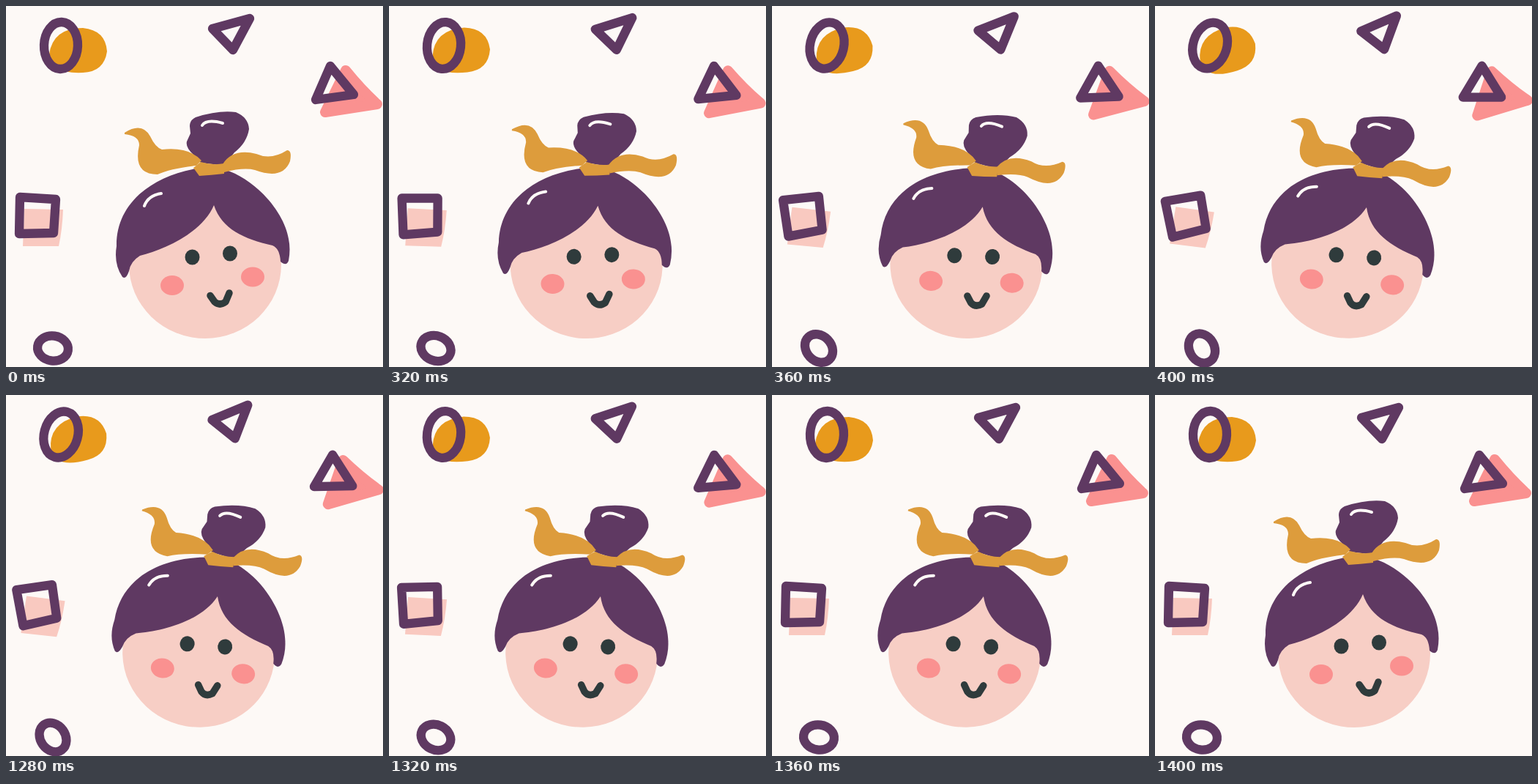
An HTML page for the animation above (1800 ms loop, 515 px wide and 493 px high).

```html
<!DOCTYPE html>
<html lang="en">
<head>
<meta charset="utf-8">
<title>Tilting head</title>
<style>
  html, body { margin: 0; width: 100%; height: 100%; overflow: hidden; background: #fdf9f6; }
  svg { display: block; width: 100%; height: 100%; }
</style>
</head>
<body>
<svg id="stage" viewBox="0 0 515 493"></svg>
<script>
const LOOP = 1800, TICK = 40, PEN = 12.3;
const PLUM = '#5f3962', CORAL = '#fa9190', SKIN = '#f7cec5', INK = '#2f3b3c';
const OCHRE = '#dd9c3c', AMBER = '#e89a1c', BLUSH = '#f9c9c0', SHINE = '#fffaf7';
const stage = document.getElementById('stage');

function add(parent, name, attrs) {
  const node = document.createElementNS('http://www.w3.org/2000/svg', name);
  for (const key in attrs) node.setAttribute(key, attrs[key]);
  return parent.appendChild(node);
}

const fill = (parent, color, d) => add(parent, 'path', { d, fill: color });
const oval = (parent, color, cx, cy, rx, ry) => add(parent, 'ellipse', { cx, cy, rx, ry, fill: color });
const line = (parent, color, width, d, inside = 'none') => add(parent, 'path', {
  d, fill: inside, stroke: color, 'stroke-width': width,
  'stroke-linecap': 'round', 'stroke-linejoin': 'round'
});
const ring = (parent, cx, cy, rx, ry, lean) => add(parent, 'ellipse', {
  cx, cy, rx, ry, fill: 'none', stroke: PLUM, 'stroke-width': PEN,
  transform: `rotate(${lean} ${cx} ${cy})`
});

const spinners = [];
function spinner(angle, cx, cy) {
  const group = add(stage, 'g', {});
  spinners.push({ group, angle, cx, cy });
  return group;
}

// Loose shapes
fill(spinner(-15, 98, 61), AMBER, 'M59 66Q64 30 105 30Q136 33 138 62Q134 90 105 91Q60 93 59 66Z');
ring(spinner(15, 75, 54.5), 75, 54, 23, 32, 2);
line(spinner(-8, 306, 37), PLUM, PEN, 'M282 31L333 17L310 60Z');
line(spinner(-8, 471, 117), CORAL, 14, 'M464 88Q485 114 507 134L436 145Z', CORAL);
line(spinner(7.5, 447, 109), PLUM, PEN, 'M443 82L475 121L423 128Z');
fill(spinner(7, 50, 303), BLUSH, 'M25 277L78 278Q77 305 72 328L23 328Z');
line(spinner(-13, 41.5, 286.5), PLUM, PEN, 'M19 261L68 264L65 310L18 311Z');
ring(spinner(52, 64, 467.5), 64, 467.5, 21, 17, 8);

// Head: face, hair, bun, ribbon
const head = add(stage, 'g', {});
oval(head, SKIN, 272, 353, 104, 101);
fill(head, PLUM, `M151 328C150 272 196 230 272 220L298 223C345 238 381 285 386 318
  Q389 332 386 348Q383 356 375 349Q374 331 364 327C325 318 295 305 284 272
  C268 310 215 333 183 341Q170 349 168 362Q164 374 159 370Q147 352 151 328Z`);
fill(head, PLUM, `M251 164Q251 156 259 152Q290 142 314 145Q331 152 332 168
  Q329 187 312 200L298 218L266 214L256 203Q245 193 247 185L252 174Z`);
fill(head, OCHRE, `M162 173Q186 158 197 178Q204 193 213 196Q250 192 267 211
  L260 218Q225 222 207 230Q173 230 182 190Q182 177 162 175Z`);
fill(head, OCHRE, `M296 216Q310 194 342 202Q362 211 384 197Q391 197 388 212
  Q378 238 340 224Q325 220 298 227Z`);
fill(head, OCHRE, 'M256 221L266 213Q282 218 298 215L298 229Q280 231 264 232Z');
line(head, SHINE, 4, 'M268 163Q274 154 296 160');
line(head, SHINE, 4, 'M189 273Q194 259 212 256');

// Features
oval(head, INK, 254.5, 343, 10, 10.5);
oval(head, INK, 306, 338, 10, 10.5);
oval(head, CORAL, 227, 381.5, 16, 13.5);
oval(head, CORAL, 337, 370, 16, 13.5);
line(head, INK, 9.5, 'M279 395.5L285 404Q292 410 300 404L305 392');

function smoothstep(x) {
  const u = Math.min(1, Math.max(0, x));
  return u * u * (3 - 2 * u);
}

function turn(node, angle, cx, cy) {
  node.setAttribute('transform', `rotate(${angle} ${cx} ${cy})`);
}

function draw(time) {
  const t = Math.floor(time % LOOP / TICK) * TICK;
  const tilt = smoothstep((t - 280) / 120);
  const settle = smoothstep((t - 1260) / 100);
  // The loose shapes ease back; the head snaps back.
  turn(head, t < 1400 ? 10 * tilt : 0, 269, 302);
  for (const { group, angle, cx, cy } of spinners) turn(group, angle * tilt * (1 - settle), cx, cy);
}

const start = performance.now();
function frame() {
  draw(performance.now() - start);
  requestAnimationFrame(frame);
}
frame();
</script>
</body>
</html>
```
